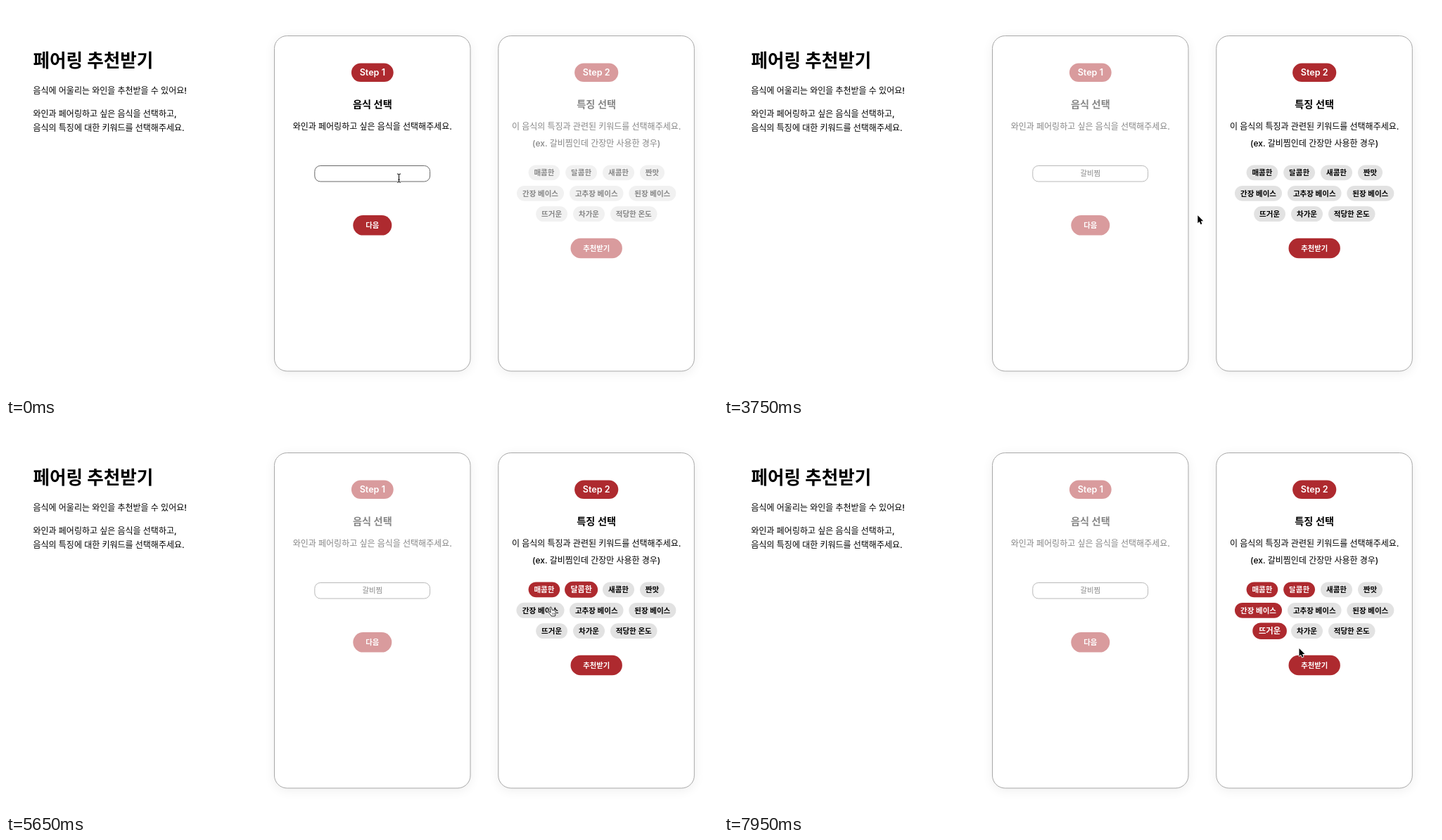
An HTML page with a canvas that plays this animation: 1012 by 554 pixels, repeating every 8000 ms.

```html
<!DOCTYPE html>
<html lang="ko">
<head>
<meta charset="utf-8">
<title>페어링 추천받기</title>
<style>
html, body { margin: 0; width: 100%; height: 100%; overflow: hidden; background: #fff; }
canvas { display: block; width: 1012px; height: 554px; }
</style>
</head>
<body>
<canvas id="stage"></canvas>
<script>
const W = 1012, H = 554, LOOP = 8000, TICK = 50;
const RED = [174, 42, 47], GREY = [226, 226, 226], BLACK = [0, 0, 0], WHITE = [255, 255, 255];
const FADED = 0.47, LEFT_X = 520.8, RIGHT_X = 839.2;

const canvas = document.getElementById('stage');
const dpr = window.devicePixelRatio || 1;
canvas.width = W * dpr;
canvas.height = H * dpr;
const ctx = canvas.getContext('2d');

// label, left, width, centre y, time of selection
const chips = [
  ['매콤한', 742.6, 44.6, 237.3, 4650],
  ['달콤한', 795.2, 44.8, 237.3, 5150],
  ['새콤한', 848, 45, 237.3],
  ['짠맛', 901, 35, 237.3],
  ['간장 베이스', 726, 67, 266.8, 5900],
  ['고추장 베이스', 801, 76.5, 266.8],
  ['된장 베이스', 885.3, 67, 266.8],
  ['뜨거운', 753.2, 44.8, 296.2, 7750],
  ['차가운', 806, 45, 296.2],
  ['적당한 온도', 859, 66.5, 296.2]
].map(([label, x, w, y, picked = Infinity]) => ({ label, x, w, y, picked }));

// element, enter, leave
const hovers = [
  ['다음', 2700, 3150],
  ['고추장 베이스', 3850, 3950],
  ['매콤한', 4000, 4700],
  ['달콤한', 4750, 5550],
  ['간장 베이스', 5600, 6400],
  ['차가운', 6500, 6600],
  ['적당한 온도', 6650, 7250],
  ['차가운', 7300, 7400],
  ['뜨거운', 7400, 7900]
];

// time, x, y of the pointer tip
const path = [
  [0, 558.5, 245], [2450, 558.5, 245], [2600, 552, 268], [2750, 537, 300], [2950, 529.5, 313],
  [3550, 528, 313], [3650, 560, 311], [3800, 730, 292], [3900, 808, 270], [4000, 795, 245],
  [4100, 780, 236], [4250, 774.5, 233], [4600, 774.5, 233], [4750, 798, 235], [4900, 813, 236],
  [5400, 813, 236], [5550, 786, 252], [5650, 774.5, 262], [6200, 774.5, 262], [6350, 789, 268],
  [6450, 820, 279.5], [6600, 858, 290], [6900, 890, 292], [7100, 890, 292], [7350, 825, 293],
  [7600, 775, 293], [7850, 775, 293], [7900, 789, 302], [7950, 817.5, 321], [8000, 817.5, 321]
];

const shapes = [
  [0, 'beam'], [1100, 'none'], [2500, 'beam'], [2600, 'arrow'], [2700, 'hand'], [3250, 'arrow'],
  [3850, 'hand'], [7950, 'arrow']
];

const typing = [
  [0, ''], [1050, 'ㄱ'], [1200, '가'], [1350, '갈'], [1500, '갋'], [1750, '갈비'],
  [1900, '갈비ㅉ'], [2000, '갈비찌'], [2150, '갈비찜']
];

const clamp = v => Math.max(0, Math.min(1, v));
const ease = v => { v = clamp(v); return v * v * (3 - 2 * v); };
const latest = (list, t) => list.filter(e => e[0] <= t).pop()[1];
const tint = (c, a) => `rgb(${c.map(v => Math.round(255 + (v - 255) * a))})`;

function hoverScale(name, t) {
  let s = 0;
  for (const [who, enter, leave] of hovers) {
    if (who !== name || t < enter) continue;
    const peak = ease((leave - enter) / 200);
    s = Math.max(s, t < leave ? ease((t - enter) / 200) : peak * (1 - ease((t - leave) / 200)));
  }
  return 1 + 0.1 * s;
}

function pointerAt(t) {
  const i = Math.max(1, path.findIndex(p => p[0] > t));
  const [t0, x0, y0] = path[i - 1], [t1, x1, y1] = path[i];
  const k = clamp((t - t0) / (t1 - t0));
  return [x0 + (x1 - x0) * k, y0 + (y1 - y0) * k];
}

function text(str, x, y, size, weight, color, align = 'center') {
  ctx.font = `${weight} ${size}px Inter, "Noto Sans CJK KR", "Noto Sans CJK", sans-serif`;
  ctx.textAlign = align;
  ctx.fillStyle = color;
  ctx.fillText(str, x, y + size * 0.38);
}

function box(x, y, w, h, r) {
  ctx.beginPath();
  ctx.roundRect(x, y, w, h, r);
}

function pill(label, cx, cy, w, h, size, weight, bg, fg, scale = 1) {
  ctx.save();
  ctx.translate(cx, cy);
  ctx.scale(scale, scale);
  box(-w / 2, -h / 2, w, h, h / 2);
  ctx.fillStyle = bg;
  ctx.fill();
  text(label, 0, -0.2, size, weight, fg);
  ctx.restore();
}

function card(x) {
  ctx.save();
  ctx.shadowColor = 'rgba(0,0,0,0.07)';
  ctx.shadowBlur = 16 * dpr;
  ctx.shadowOffsetY = 3 * dpr;
  box(x, 42.5, 278.5, 477.5, 18);
  ctx.fillStyle = '#fff';
  ctx.fill();
  ctx.restore();
  ctx.lineWidth = 1;
  ctx.strokeStyle = '#a8a8a8';
  ctx.stroke();
}

function intro() {
  text('페어링 추천받기', 38.5, 77, 25.6, 700, '#000', 'left');
  text('음식에 어울리는 와인을 추천받을 수 있어요!', 38.5, 120.7, 12, 500, '#000', 'left');
  text('와인과 페어링하고 싶은 음식을 선택하고,', 38.5, 153.5, 12, 500, '#000', 'left');
  text('음식의 특징에 대한 키워드를 선택해주세요.', 38.5, 173.5, 12, 500, '#000', 'left');
}

function field(t, a) {
  box(438.8, 227.5, 163.8, 22.5, 8);
  ctx.lineWidth = 1;
  ctx.strokeStyle = tint([105, 105, 105], a);
  ctx.stroke();
  const value = latest(typing, t);
  text(value, LEFT_X, 238.5, 10.4, 500, tint(BLACK, a));
  const right = LEFT_X + ctx.measureText(value).width / 2;
  ctx.fillStyle = '#000';
  if ((t >= 450 && t < 950) || (t >= 1050 && t < 2650)) ctx.fillRect(right, 233, 1, 11.5);
  if (value && t < 3100) {
    const w = ctx.measureText(value.slice(-1)).width;
    ctx.fillRect(right - w, 243, w, 1);
  }
}

function stepOne(t, a) {
  const ink = tint(BLACK, a), red = tint(RED, a);
  pill('Step 1', LEFT_X, 94.8, 59.8, 26.4, 12.6, 600, red, '#fff');
  text('음식 선택', LEFT_X, 139.3, 14.2, 600, ink);
  text('와인과 페어링하고 싶은 음식을 선택해주세요.', LEFT_X, 171.7, 12, 500, ink);
  field(t, a);
  pill('다음', LEFT_X, 312.3, 55, 28.6, 10.4, 600, red, '#fff', hoverScale('다음', t));
}

function stepTwo(t, a) {
  const ink = tint(BLACK, a), red = tint(RED, a);
  pill('Step 2', RIGHT_X, 94.8, 62.2, 26.4, 12.6, 600, red, '#fff');
  text('특징 선택', RIGHT_X, 139.3, 14.2, 600, ink);
  text('이 음식의 특징과 관련된 키워드를 선택해주세요.', RIGHT_X, 171.7, 12, 500, ink);
  text('(ex. 갈비찜인데 간장만 사용한 경우)', RIGHT_X, 195, 12, 500, ink);
  for (const c of chips) {
    const on = t >= c.picked;
    pill(c.label, c.x + c.w / 2, c.y, c.w, 21.8, 10.5, 600, tint(on ? RED : GREY, a),
      on ? tint(WHITE, 1) : ink, hoverScale(c.label, t));
  }
  pill('추천받기', RIGHT_X, 345, 73.4, 28.6, 10.3, 600, red, '#fff');
}

const hand = new Path2D('M-1.4 1.3Q-1.4 0-.3 0Q.7 0 1 1.2L1.7 4.6Q2.6 4 3.5 5Q4.6 4.4 5.2 5.5' +
  'Q6.6 5.3 6.9 6.8Q7.3 8.6 6.5 10.4L6.1 13H.6Q0 11.6-1.6 10L-3.5 7.9Q-4.2 6.7-3 6.4Q-2 6.3-.3 8Z');
const fingers = new Path2D('M1.9 8.4L2.3 11M3.5 8.2L3.8 11M5 8L5.2 10.8');
const arrow = new Path2D('M0 0V11L2.5 8.7L4.2 12.6L6.1 11.8L4.4 8H7.9Z');
const beam = new Path2D('M-2.6-6Q-.4-6 0-4.6Q.4-6 2.6-6M0-4.6V4.8M-2.6 6.2Q-.4 6.2 0 4.8Q.4 6.2 2.6 6.2M-1.3 2.3H1.3');

function outline(shape, color, width) {
  ctx.strokeStyle = color;
  ctx.lineWidth = width;
  ctx.stroke(shape);
}

function pointer(t) {
  const kind = latest(shapes, t);
  if (kind === 'none') return;
  ctx.save();
  ctx.translate(...pointerAt(t));
  ctx.lineJoin = 'round';
  if (kind === 'beam') {
    outline(beam, '#fff', 2.2);
    outline(beam, '#111', 1.1);
  } else if (kind === 'arrow') {
    outline(arrow, '#fff', 1.6);
    ctx.fillStyle = '#000';
    ctx.fill(arrow);
  } else {
    outline(hand, '#fff', 2);
    ctx.fillStyle = '#fff';
    ctx.fill(hand);
    outline(hand, '#111', 0.95);
    outline(fingers, '#333', 0.6);
  }
  ctx.restore();
}

function draw(t) {
  const swap = clamp((t - 3200) / 150);
  ctx.setTransform(dpr, 0, 0, dpr, 0, 0);
  ctx.fillStyle = '#fff';
  ctx.fillRect(0, 0, W, H);
  intro();
  card(381.5);
  card(699.8);
  stepOne(t, 1 + (FADED - 1) * swap);
  stepTwo(t, FADED + (1 - FADED) * swap);
  pointer(t);
}

const start = performance.now();
function loop() {
  const t = (performance.now() - start) % LOOP;
  draw(Math.floor(t / TICK) * TICK);
  requestAnimationFrame(loop);
}
loop();
</script>
</body>
</html>
```
